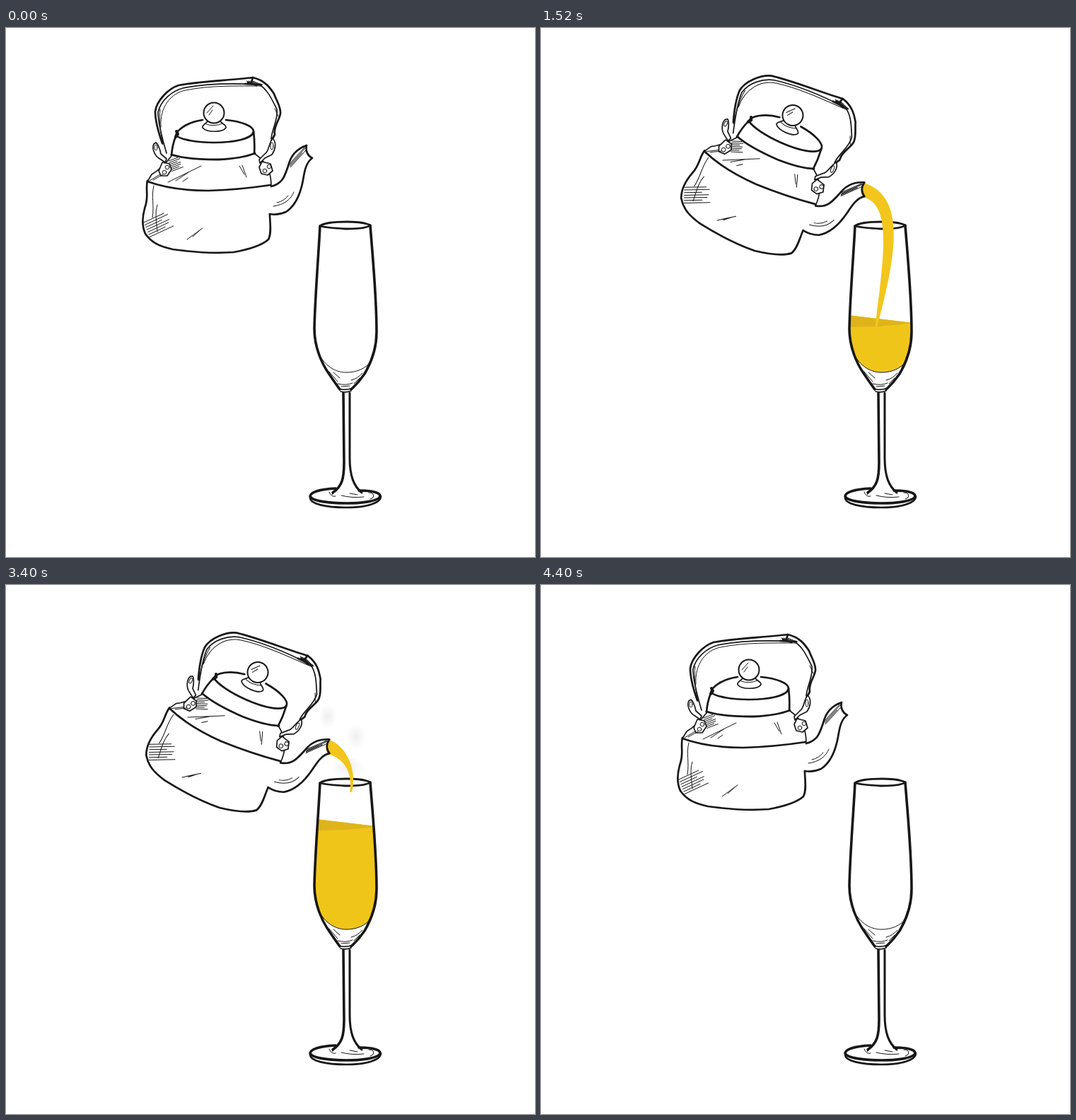
These frames come from a looping animation (748x748 px, 4520 ms). An HTML page:

```html
<!DOCTYPE html>
<html lang="en">
<head>
<meta charset="utf-8">
<title>Kettle and glass</title>
<style>
html, body { margin: 0; width: 100%; height: 100%; overflow: hidden; background: #fff; }
svg { display: block; width: 100vw; height: 100vh; }
.ink { fill: none; stroke: #171717; stroke-linecap: round; stroke-linejoin: round; }
.main { stroke-width: 2.7; }
.wall { stroke-width: 3.6; }
.mid { stroke-width: 1.7; }
.thin { stroke-width: 1; }
.white { fill: #fff; }
</style>
</head>
<body>
<svg viewBox="0 0 748 748">
  <defs>
    <clipPath id="bowl">
      <path d="M444 280C442 320 437 380 436 425C436 446 440 459 446 468C456 481 470 487 481 487C497 487 508 481 515 473C521 462 524 448 524 430C524 380 519 330 515 279Z"/>
    </clipPath>
    <radialGradient id="mist">
      <stop offset="0" stop-color="#333"/>
      <stop offset="1" stop-color="#333" stop-opacity="0"/>
    </radialGradient>
  </defs>

  <g id="puffs" fill="url(#mist)">
    <ellipse cx="455" cy="186" rx="13" ry="17"/>
    <ellipse cx="495" cy="214" rx="14" ry="18"/>
    <ellipse cx="484" cy="258" rx="24" ry="16"/>
  </g>

  <g clip-path="url(#bowl)">
    <path id="juice" fill="#f0c51a"/>
    <path id="sheet" fill="#dfb41a"/>
  </g>

  <g class="ink">
    <g class="wall">
      <path d="M444 280C442 320 437 380 436 425C436 452 447 475 456 488Q464 500 472 511"/>
      <path d="M515 279C519 330 524 380 524 430C524 452 517 472 507 489Q498 502 488 511"/>
      <path stroke-width="2.8" d="M444 280C450 275 465 274 482 274C499 274 510 276 515 279C510 283 496 284 480 284C464 283 452 282 444 280Z"/>
      <path d="M477 516L478 614C478 638 475 648 462 657"/>
      <path stroke-width="3" d="M486 516L486 608C486 634 492 648 503 657"/>
      <path d="M466 651C446 652 431 656 430 662C432 669 458 672 482 672C508 672 528 668 529 662C529 656 514 654 499 654"/>
      <path stroke-width="2.6" d="M430 664C430 673 452 678 481 678C509 678 530 672 530 662"/>
    </g>
    <path class="mid" d="M471 510Q480 513 490 509M473 514Q481 516 488 513"/>
    <g class="thin">
      <path d="M446 467C456 482 470 487 481 487C497 487 508 481 515 473"/>
      <path d="M457 486L469 500M463 487L472 495M469 503Q481 506 490 502M504 488Q497 496 488 498M500 495L492 503M474 507L486 506"/>
      <path d="M457 656Q460 664 466 662M474 661Q490 665 506 663M486 658L497 660M513 657Q522 657 519 664L515 666M466 655L461 660"/>
    </g>
  </g>

  <path id="stream" fill="#f2c61c"/>
  <g id="wisps" class="ink thin">
    <path d="M464 302C462 306 465 308 463 311"/>
    <path d="M498 292C502 303 498 314 504 328"/>
    <path d="M490 260C493 267 492 273 489 277"/>
  </g>

  <g id="kettle" class="ink">
    <g class="main">
      <path d="M221 163C215 146 211 130 211 118C213 103 229 86 244 81C278 75 318 74 349 70C366 74 373 84 379 93C383 104 389 112 388 121C386 132 378 139 380 151L376 158"/>
      <path class="mid" d="M227 177C219 150 215 132 215 119C219 102 235 89 250 85C285 78 325 78 358 80C370 87 376 101 383 115C385 130 376 142 375 157"/>
      <path class="thin" d="M219 140C217 112 233 92 254 88C288 81 326 82 361 82M222 165C218 145 216 130 218 115M380 114L385 125"/>
      <path d="M338 79L361 80M342 77L354 81M349 70L347 77"/>
      <path d="M240 153C240 145 256 133 278 130M311 130C333 132 351 139 350 147C347 157 322 162 294 162C270 162 248 158 240 152"/>
      <path stroke-width="4" d="M240 154L243 150L241 146"/>
      <path d="M240 153Q235 166 234 180M350 146Q352 162 351 178"/>
      <path stroke-width="2.8" d="M234 179C252 185 278 186 300 186C322 185 340 182 352 177"/>
      <path class="white mid" d="M285 132C282 136 277 137 278 141C284 148 306 148 311 141C312 137 306 136 303 132Z"/>
      <circle class="white" stroke-width="2" cx="294" cy="120" r="14.5"/>
      <path class="thin" d="M283 136Q294 140 306 135M284 120L293 110M287 123L292 116"/>
      <path class="mid" d="M234 181Q220 199 206 207L200 217M352 178Q365 187 371 200Q375 210 375 224"/>
      <path d="M200 217C225 226 256 230 286 230C320 229 348 226 374 222"/>
      <path d="M200 216C197 228 202 237 197 252C192 268 192 280 197 291C206 304 218 309 236 313C264 317 295 319 322 317C344 313 361 308 371 299C376 290 373 275 373 263"/>
      <path d="M375 224C391 220 394 210 399 195C403 179 413 170 425 166C423 174 427 181 433 184C424 190 422 203 420 215C416 237 408 252 396 260Q385 265 373 263"/>
    </g>
    <g class="mid">
      <path class="white" d="M209 164C206 170 210 180 216 184L225 190L227 185L219 178C218 172 215 164 212 162Z"/>
      <path class="white" d="M221 190L216 202L219 209L228 209L234 200L231 192Z"/>
      <path class="white" d="M377 156C383 162 381 172 376 179L366 184L359 191L358 186L366 178C372 175 371 164 377 156Z"/>
      <path class="white" d="M362 189L358 197L361 206L370 208L377 202L374 192Z"/>
    </g>
    <g class="thin">
      <ellipse cx="212" cy="169" rx="2" ry="4"/>
      <ellipse cx="376" cy="167" rx="2" ry="5"/>
      <circle cx="224" cy="204" r="2.8"/>
      <circle cx="228" cy="197" r="2.8"/>
      <circle cx="366" cy="202" r="2.8"/>
      <circle cx="372" cy="196" r="2.8"/>
      <path d="M209 223C205 239 210 250 207 268M214 250C210 262 213 275 214 288"/>
      <path d="M240 216L258 204M229 218L276 195M250 217L257 212M330 195L337 207M334 194L340 211"/>
      <path d="M256 299L278 283M264 295L274 286M203 216L218 207M208 215L222 207"/>
      <path d="M378 252C394 250 403 242 407 232M383 247Q393 245 399 237"/>
    </g>
    <path id="hatch" class="thin"/>
  </g>
</svg>
<script>
const LOOP = 4520, STEP = 40, LAST = 4400;
const FLOOR = 489, DEPTH = 153;
const $ = id => document.getElementById(id);
const clamp = v => Math.min(1, Math.max(0, v));
const ease = v => v * v * (3 - 2 * v);
const span = (t, a, b) => clamp((t - a) / (b - a));
const fade = (t, a, b, c, d) => span(t, a, b) * (1 - span(t, c, d));

// n pen strokes along (dx, dy), each moved on by (sx, sy)
function hatch(x, y, dx, dy, sx, sy, n) {
  let d = '';
  for (let i = 0; i < n; i++) {
    const w = 1 + 0.2 * Math.sin(i * 2.3);
    d += `M${x + sx * i} ${y + sy * i}l${dx * w} ${dy * w}`;
  }
  return d;
}

$('hatch').setAttribute('d',
  hatch(195, 275, 28, -13, 1.4, 3.4, 7) +
  hatch(230, 188, 13, -5, 0.8, 2.4, 7) +
  hatch(401, 192, 21, -23, 0.4, 1.6, 4) +
  hatch(340, 75, 12, 5, 3, 0, 4));

// Fill slows as the glass widens; the surface rocks with a steady beat
function surface(t) {
  const fill = Math.sin(span(t, 560, 3400) * Math.PI / 2);
  const left = 1 - ease(span(t, 3900, 4280));
  return {
    fill,
    y: FLOOR - DEPTH * fill * left,
    tilt: 5.5 * Math.cos((t - 1520) / 470 * 2 * Math.PI)
  };
}

function drawJuice({ y, tilt }) {
  const l = y - tilt, r = y + tilt;
  const top = `M434 ${l}L526 ${r}`;
  const deepL = l + 3 * Math.max(0, tilt), deepR = r + 3 * Math.max(0, -tilt);
  const full = y < FLOOR - 0.5;
  $('juice').setAttribute('d', full ? top + 'V500H434Z' : '');
  $('sheet').setAttribute('d',
    full ? `${top}V${deepR}Q480 ${(deepL + deepR) / 2 + 4} 434 ${deepL}Z` : '');
}

// Two edges leave the spout, arc over and meet at the falling tip
function drawStream(t, { y, tilt, fill }) {
  const back = span(t, 3300, 3520);
  const reach = span(t, 400, 560) * (1 - back);
  if (!reach) return $('stream').setAttribute('d', '');
  const land = 474 + 9 * fill - 0.8 * tilt + 20 * back;
  const ex = 455 + (land - 455) * Math.min(1, 4 * reach);
  const ey = 229 + (Math.min(y + 10, 480) - 229) * reach;
  const h = ey - 219, k = Math.min(1, h / 205);
  $('stream').setAttribute('d',
    `M457 219C${457 + 63 * k} ${219 + h * 0.1} ${ex + 26 * k} ${ey - h * 0.46} ${ex + 1.5} ${ey}` +
    `H${ex - 1.5}C${ex + 10 * k} ${ey - h * 0.48} ${455 + 43 * k} ${239 + h * 0.05} 455 239` +
    'Q449 230 457 219Z');
}

function drawSteam(id, t, still, rise, opacity) {
  $(id).setAttribute('transform', `translate(0 ${(still - t) * rise})`);
  $(id).setAttribute('opacity', opacity);
}

function draw(t) {
  const angle = 23.8 * (ease(span(t, 0, 440)) - ease(span(t, 3410, 4130)));
  const s = surface(t);
  $('kettle').setAttribute('transform', `rotate(${angle} 316.7 268.9)`);
  drawJuice(s);
  drawStream(t, s);
  drawSteam('wisps', t, 2680, 0.06, 0.5 * fade(t, 2440, 2640, 2720, 2960));
  drawSteam('puffs', t, 3400, 0.08, 0.08 * fade(t, 2880, 3200, 3440, 3720));
}

const start = performance.now();
function tick() {
  const t = (performance.now() - start) % LOOP;
  draw(Math.min(LAST, Math.floor(t / STEP) * STEP));
  requestAnimationFrame(tick);
}
tick();
</script>
</body>
</html>
```
